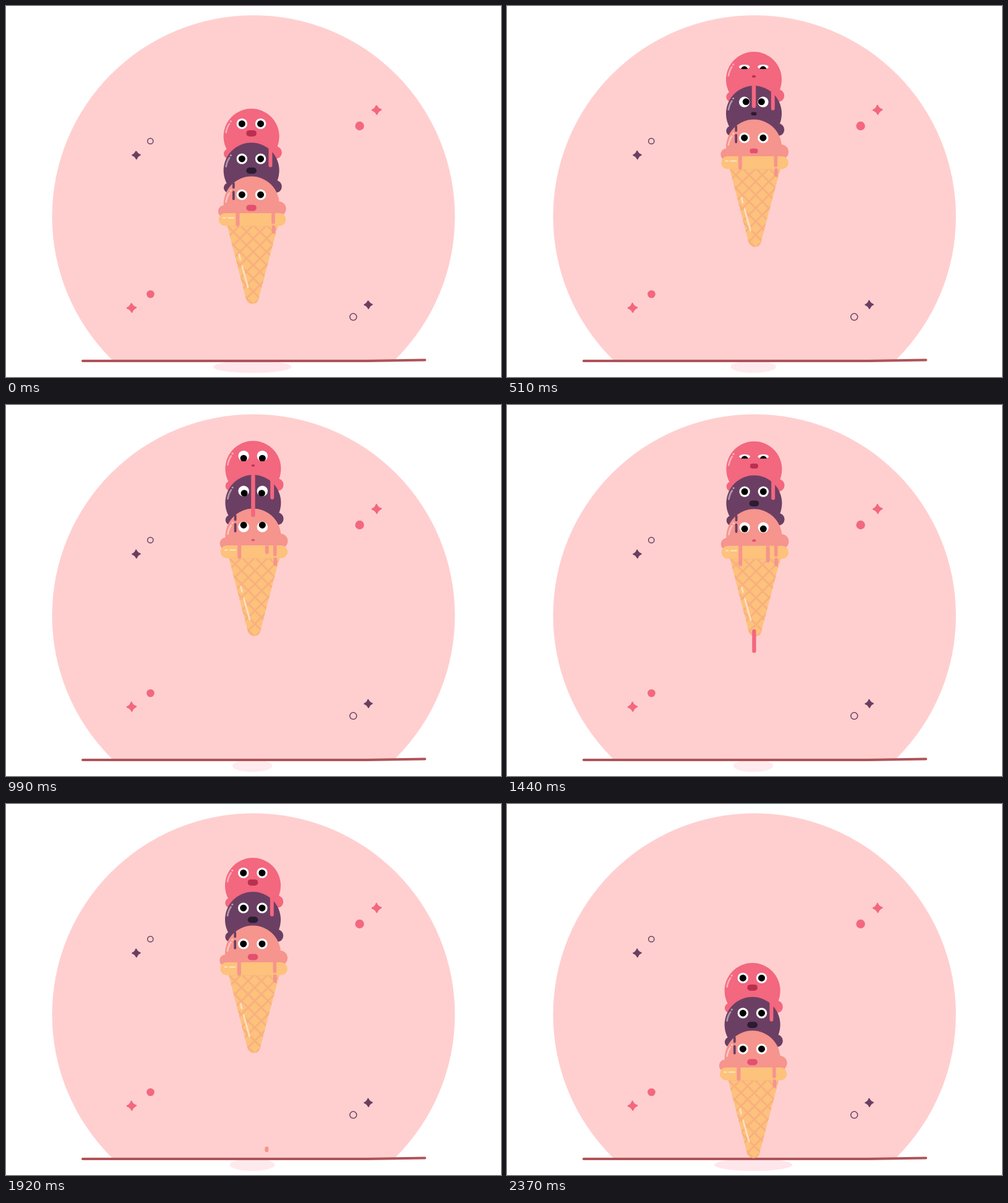
An HTML page with a canvas for the animation above (2400 ms loop, 800 by 600 pixels).

```html
<!DOCTYPE html>
<html lang="en">
<head>
<meta charset="utf-8">
<title>Ice cream jump</title>
<style>
html, body { margin: 0; width: 100%; height: 100%; overflow: hidden; background: #fff; }
canvas { display: block; }
</style>
</head>
<body>
<canvas id="stage" width="800" height="600"></canvas>
<script>
const ctx = document.getElementById('stage').getContext('2d');
const LOOP = 2400, FRAME = 30, APEX = 1170, GROUND = 572;
const PINK = '#f3677f', PLUM = '#6b3f63', SALMON = '#f6948e', WAFER = '#fdc27b';

function fill(color, build) {
  ctx.fillStyle = color;
  ctx.beginPath();
  build();
  ctx.fill();
}
function ellipse(x, y, rx, ry, color) {
  fill(color, () => ctx.ellipse(x, y, rx, ry, 0, 0, Math.PI * 2));
}
function dot(x, y, r, color) { ellipse(x, y, r, r, color); }
function box(x, y, w, h, r, color) {
  fill(color, () => ctx.roundRect(x, y, w, h, r));
}
function drip(x, top, bottom, width, color) {
  if (bottom > top) box(x - width / 2, top, width, bottom - top, width / 2, color);
}
function line(color, width, ...p) {
  ctx.strokeStyle = color;
  ctx.lineWidth = width;
  ctx.lineCap = ctx.lineJoin = 'round';
  ctx.beginPath();
  ctx.moveTo(p[0], p[1]);
  for (let i = 2; i < p.length; i += 2) ctx.lineTo(p[i], p[i + 1]);
  ctx.stroke();
}

// Cubic bezier acceleration with both handles resting at zero.
function accelerate(x, a, b) {
  let low = 0, high = 1;
  for (let i = 0; i < 24; i++) {
    const s = (low + high) / 2, q = 1 - s;
    if (3 * q * q * s * a + 3 * q * s * s * b + s ** 3 < x) low = s; else high = s;
  }
  return low ** 3;
}

// Interpolates a flat list of time, value pairs.
function track(t, ...keys) {
  if (t <= keys[0]) return keys[1];
  for (let i = 2; i < keys.length; i += 2) {
    if (t > keys[i]) continue;
    const u = (t - keys[i - 2]) / (keys[i] - keys[i - 2]);
    return keys[i - 1] + (keys[i + 1] - keys[i - 1]) * u;
  }
  return keys[keys.length - 1];
}
function fall(t, start, span, distance, power = 2) {
  return distance * Math.max(0, (t - start) / span) ** power;
}

function star(x, y, r, color) {
  ctx.save();
  ctx.translate(x, y);
  ctx.rotate(-0.05);
  fill(color, () => {
    ctx.moveTo(0, -r);
    for (let i = 0; i < 4; i++) {
      ctx.quadraticCurveTo(r * 0.27, -r * 0.27, r, 0);
      ctx.rotate(Math.PI / 2);
    }
  });
  ctx.strokeStyle = color;
  ctx.lineWidth = 2.2;
  ctx.lineJoin = 'round';
  ctx.stroke();
  ctx.restore();
}
function ring(x, y, r) {
  ctx.strokeStyle = PLUM;
  ctx.lineWidth = 1.5;
  ctx.beginPath();
  ctx.arc(x, y, r, 0, Math.PI * 2);
  ctx.stroke();
}

function scene(p) {
  ctx.fillStyle = '#fff';
  ctx.fillRect(0, 0, 800, 600);
  dot(400, 340.5, 325.5, '#ffcfcf');
  ctx.fillStyle = '#fff';
  ctx.fillRect(0, 574, 800, 26);
  star(599, 168, 7.2, PINK);
  star(203, 488, 7.2, PINK);
  star(210.5, 241, 6.2, PLUM);
  star(585.5, 483, 6.2, PLUM);
  dot(571.5, 194, 7.2, PINK);
  dot(233.5, 466, 6.3, PINK);
  ring(233.3, 218.5, 4.6);
  ring(561.2, 502.8, 5.5);
  ellipse(398, 583.5, 32 + 31 * p, 10, `rgb(254, ${235 - 5 * p}, ${237 - 2 * p})`);
  line('#af5358', 4.2, 124, 574, 584, 574, 677, 572.5);
}

function gloss(y) {
  ctx.strokeStyle = 'rgba(255,255,255,.45)';
  ctx.lineWidth = 2.8;
  ctx.lineCap = 'round';
  ctx.beginPath();
  ctx.moveTo(-41, y + 38.5);
  ctx.quadraticCurveTo(-39.5, y + 30, -35.5, y + 24.5);
  ctx.stroke();
  dot(-33.3, y + 20.5, 1.6, 'rgba(255,255,255,.5)');
}

function face(eyeY, mouthY, mouthColor, { open = 1, inward = 0, down = 0, mouth }) {
  const ry = 3.6 + 5 * open;
  for (const side of [-1, 1]) {
    const x = side * 15.1 - 0.2;
    ellipse(x, eyeY, 8.7, ry, '#fff');
    ctx.save();
    ctx.beginPath();
    ctx.rect(x - 10, eyeY - 20, 20, 20 + ry);
    ctx.clip();
    dot(x - side * inward, eyeY + down, 5.5, '#000');
    ctx.restore();
  }
  const w = 16.5 * mouth, h = 10 * mouth;
  box(-w / 2, mouthY - h / 2, w, h, h / 2, mouthColor);
}

function conePath() {
  ctx.moveTo(-39.5, 188);
  ctx.lineTo(43, 188);
  ctx.lineTo(11.5, 308);
  ctx.quadraticCurveTo(9.5, 315.5, 1.5, 315.5);
  ctx.quadraticCurveTo(-6.5, 315.5, -8.5, 308);
  ctx.closePath();
}
function cone() {
  fill(WAFER, conePath);
  ctx.save();
  ctx.clip();
  for (let k = -10; k < 10; k++) {
    const y = 253 + k * 21.5;
    line('#f9b080', 3, -60, y - 63, 60, y + 57);
    line('#f9b080', 3, -60, y + 63, 60, y - 57);
  }
  ctx.restore();
  line('#fee0bf', 2.8, -20, 236, -18, 244);
  line('#fee0bf', 2.8, -15, 254.5, -5.5, 289);
  box(-52.8, 169, 108.6, 20.8, 10.4, WAFER);
  line('#f9b782', 1, -38, 190.3, 41, 190.3);
  line('#fee0bf', 2.2, -45.5, 176.7, -42, 176.7);
  line('#fee0bf', 2.2, -37.5, 176.7, -28.5, 176.7);
}

function scoop(y, color) {
  dot(0, y + 45, 45, color);
  dot(-36.5, y + 73, 8.2, color);
  dot(39, y + 71, 10.2, color);
  box(-37, y + 60, 74, 20, 8, color);
  gloss(y);
}

function iceCream(t, y) {
  const floor = GROUND - y;
  scoop(0, PINK);
  face(24.4, 39.9, '#b9304f', {
    open: track(t, 420, 1, 510, 0, 600, 1, 1350, 1, 1440, 0, 1530, 1),
    down: track(t, 390, 0, 510, 4.4, 900, 3.8, 1350, 3.8, 1440, 4.4, 1530, 0),
    mouth: track(t, 150, 1, 480, 0.36, 990, 0.32, 1200, 0.32, 1440, 0.8, 1560, 1)
  });

  scoop(55, PLUM);
  drip(30.8, 58, 94.7, 6, PINK);
  face(81.2, 100.3, '#2b1b33', {
    inward: track(t, 240, 0, 510, 2.6, 990, 1, 1230, 0),
    down: track(t, 510, -0.4, 990, 3.5, 1110, 4, 1300, 0) * (t > 240),
    mouth: track(t, 150, 1, 510, 0.54, 800, 0.34, 1080, 0.34, 1440, 0.95, 1560, 1)
  });

  dot(0, 154.5, 45, SALMON);
  dot(-44, 166, 9.8, SALMON);
  dot(44, 162, 12, SALMON);
  box(-46, 160, 92, 14, 5, SALMON);
  gloss(112);
  drip(-28.8, 119, 129.5, 3.8, PLUM);
  drip(-28.8, 133, 148, 3.8, PLUM);
  face(139.2, 160.4, '#e4506f', {
    down: track(t, 600, 0, 870, -3, 1020, -3, 1200, 2.3, 1500, 2.3, 1710, 0),
    mouth: track(t, 300, 1, 510, 0.79, 900, 0.32, 1440, 0.38, 1800, 1)
  });

  cone();
  drip(-22.2, 166, track(t, 990, 190.5, 1440, 202, 1740, 190.5), 6, SALMON);
  drip(35.3, 166, 186.5, 5.6, SALMON);
  drip(35.8, 188.5, 202, 5.6, SALMON);

  const saltTip = track(t, 690, 169, 990, 183, 1440, 196) + fall(t, 1500, 420, 280);
  const saltTop = 169 + fall(t, 1560, 360, 298);
  if (t > 690) drip(22.3, saltTop, Math.min(saltTip, floor), 6, SALMON);

  const pinkTip = track(t, 240, 54, 510, 91, 990, 123) + fall(t, 990, 450, 219, 2.5);
  const pinkTop = 54 + fall(t, 1060, 380, 250);
  if (t > 240) drip(0, pinkTop, Math.min(pinkTip, floor), 6.4, PINK);
}

function draw(now) {
  const t = Math.floor((now % LOOP) / FRAME) * FRAME;
  const rising = t < APEX;
  const p = rising
    ? accelerate(1 - t / APEX, 0.272, 0.796)
    : accelerate((t - APEX) / (LOOP - FRAME - APEX), 0.383, 0.866);
  const y = 57.5 + p * (rising ? 108.5 : 199.5);
  scene(p);
  ctx.save();
  ctx.translate(399.4 - 2.8 * p, y);
  iceCream(t, y);
  ctx.restore();
  requestAnimationFrame(draw);
}
requestAnimationFrame(draw);
</script>
</body>
</html>
```
